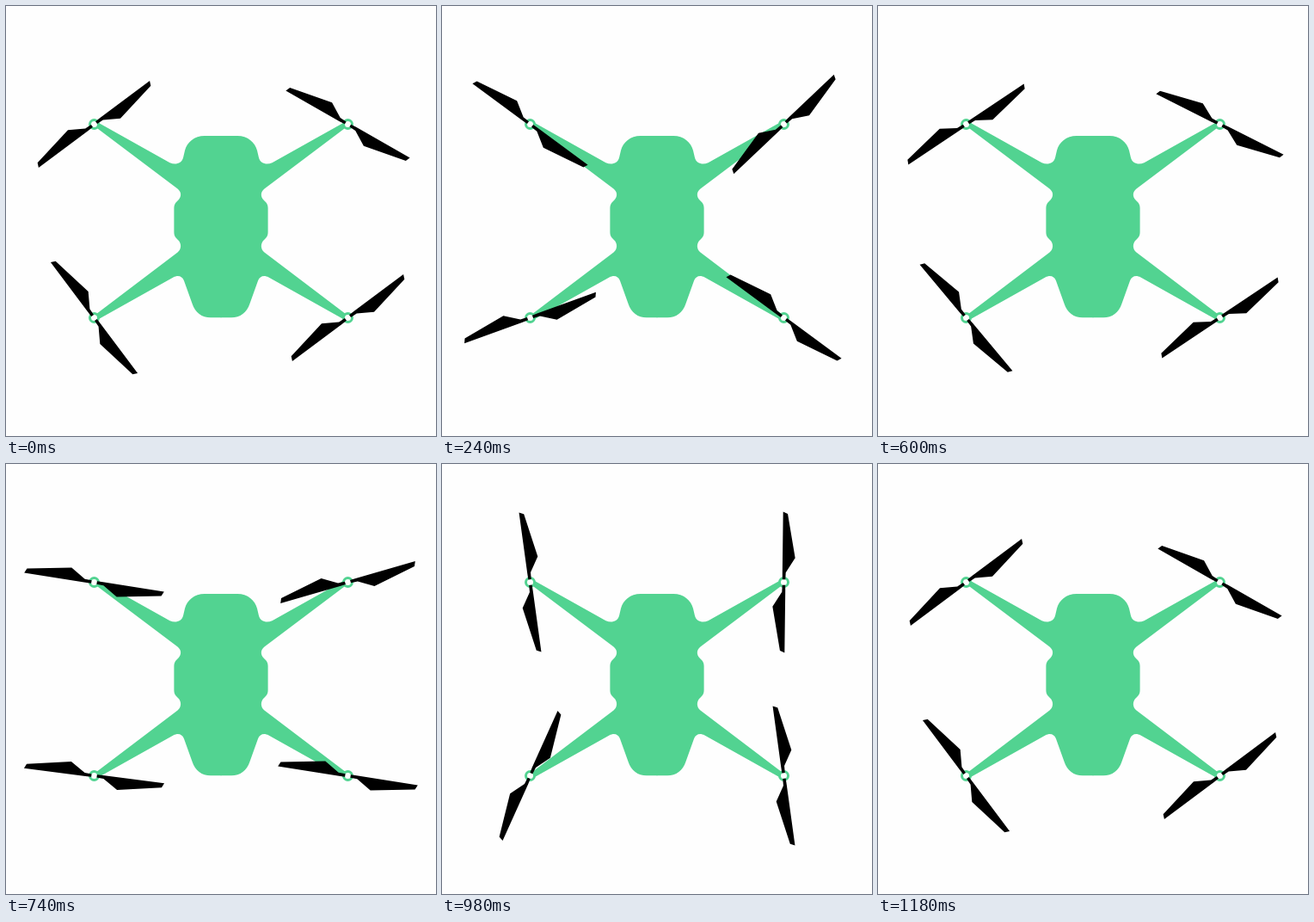
Write an HTML page that moves like this. It is 500 by 500 pixels and loops after 1220 ms.

```html
<!DOCTYPE html>
<html lang="en">
<head>
<meta charset="utf-8">
<title>Drone</title>
<style>
  html, body { margin: 0; width: 100%; height: 100%; overflow: hidden; background: #fefefe; }
  svg { display: block; width: 100vw; height: 100vh; }
</style>
</head>
<body>
<svg viewBox="0 0 500 500">
  <defs>
    <path id="blade" d="M82 -2.4 L79.6 3 L28.6 12.6 L11.3 2 L3.2 1.7 L3.2 -1.7 L10 -1.9 Z"/>
    <path id="half" d="M250.5 151 H231
      C219 151 210.500 158.500 208 168 L206 176.500
      C204.500 182.500 197.500 185.500 190.500 182.300
      L107 135.500 L104.500 141 L199.500 212.500
      C204 216 204.300 221.500 200.500 225.500 L198 228
      C196.200 230 195.400 232 195.400 235 V263
      C195.400 266 196.200 268 198 270 L200.500 272.500
      C204.300 276.500 204 283 199.500 286.500
      L104.500 358.500 L107 364.500 L194.500 315.500
      C200 312.500 205 314 207 319.500 L216.500 346
      C220 356.500 227.500 362.300 238 362.300 H250.500 Z"/>
  </defs>
  <g fill="#52d391">
    <use href="#half"/>
    <use href="#half" transform="matrix(-1 0 0 1 500 0)"/>
  </g>
  <g id="rotors"></g>
</svg>
<script>
  const LOOP = 1220, TURN = 1180, STEP = 20;
  // centre x, centre y, start angle, spin direction
  const rotors = [
    [102.5, 137.5, -36.4, 1],
    [397.5, 137.5, 30.1, -1],
    [102.5, 362.5, 53.6, -1],
    [397.5, 362.5, -36.4, 1]
  ];
  const root = document.getElementById("rotors");
  root.innerHTML = rotors.map(([x, y]) => `
    <g transform="translate(${x} ${y})">
      <circle r="5" fill="#fefefe" stroke="#52d391" stroke-width="3"/>
      <g class="prop"><use href="#blade"/><use href="#blade" transform="rotate(180)"/></g>
    </g>`).join("");
  const props = root.querySelectorAll(".prop");

  function draw(ms) {
    const t = Math.min(Math.floor((ms % LOOP) / STEP) * STEP, TURN);
    rotors.forEach(([, , start, dir], i) =>
      props[i].setAttribute("transform", `rotate(${start + dir * 360 * t / TURN})`));
  }

  const begin = performance.now();
  function tick() {
    draw(performance.now() - begin);
    requestAnimationFrame(tick);
  }
  tick();
</script>
</body>
</html>
```
